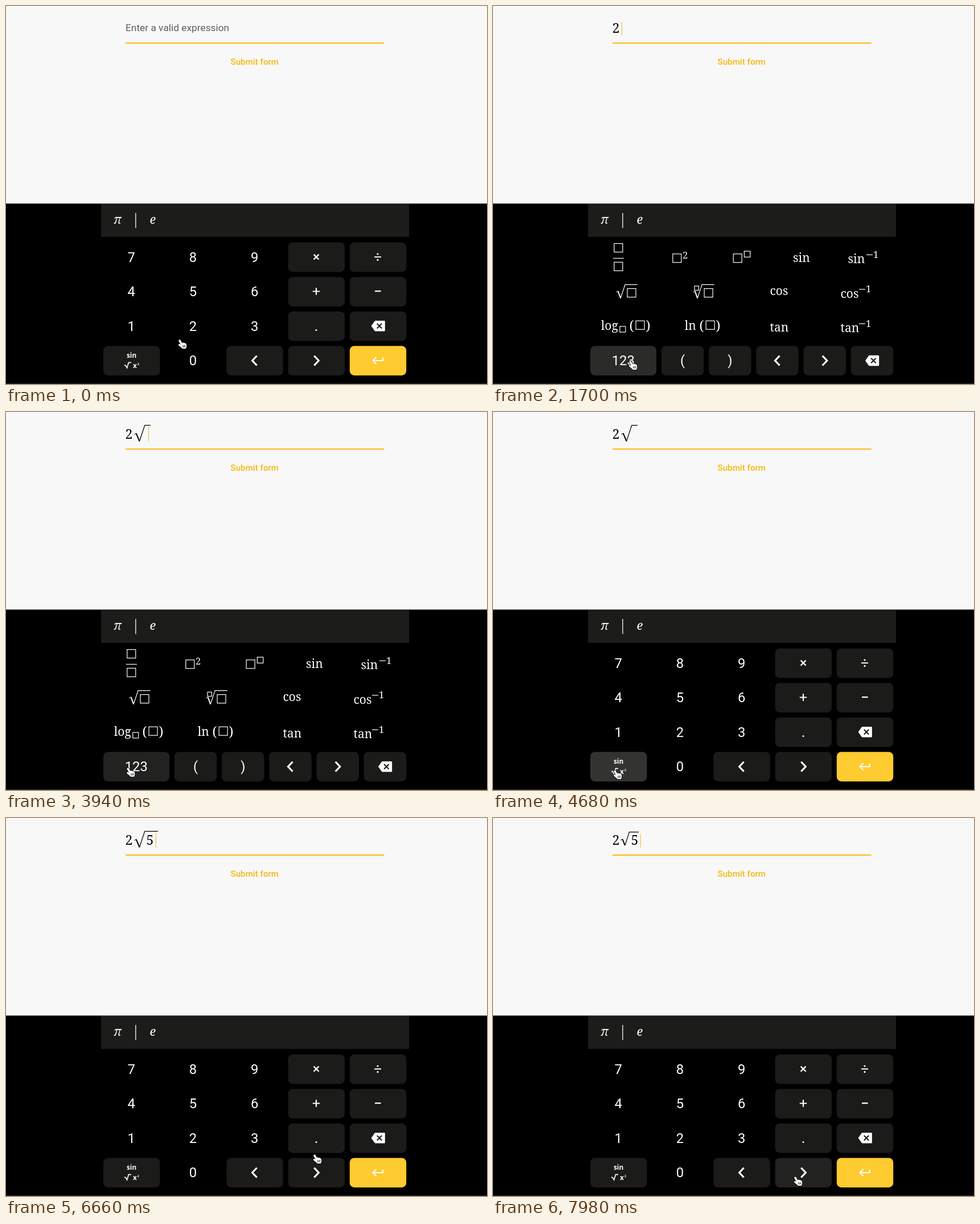
Write an HTML page that moves like this. It is 845 by 663 pixels and loops after 8 s.

```html
<!DOCTYPE html>
<html lang="en">
<head>
<meta charset="utf-8">
<title>Math keyboard</title>
<style>
  html, body { margin: 0; width: 100%; height: 100%; overflow: hidden; background: #f8f8f8; }
  svg { display: block; width: 845px; height: 663px; }
  .ui { font: 23.8px Roboto, sans-serif; fill: #fff; text-anchor: middle; }
  .hint { font: 17.32px Roboto, sans-serif; fill: #5e5e5e; }
  .submit { font: 500 15.15px Roboto, sans-serif; fill: #f3b90c; text-anchor: middle; }
  .word { font: 21px "Noto Serif", serif; fill: #fff; }
  .digit { font: 23px "Noto Serif", serif; }
  .sup { font: 16.5px "Noto Serif", serif; fill: #fff; }
  .var { font: italic 21.5px "Noto Serif", serif; fill: #fff; }
  .icon { font: bold 11.8px "Open Sans", sans-serif; fill: #fff; text-anchor: middle; }
  .line { fill: none; stroke: #fff; }
</style>
</head>
<body>
<svg id="stage" viewBox="0 0 845 663" xmlns="http://www.w3.org/2000/svg"></svg>
<script>
const stage = document.getElementById('stage');
const LOOP = 8000, BLINK = 530;
const LEFT = 166.6, WIDTH = 541, TOP = 410.3, ROW = 60.5, GAP = 4.4;
const DARK = '#1b1b1a', GOLD = '#fecb30';

function add(parent, tag, attrs = {}, content = '') {
  const el = document.createElementNS('http://www.w3.org/2000/svg', tag);
  for (const k in attrs) el.setAttribute(k, attrs[k]);
  el.textContent = content;
  parent.appendChild(el);
  return el;
}
const rect = (p, x, y, width, height, fill, rx = 0) =>
  add(p, 'rect', { x, y, width, height, fill, rx });
const text = (p, cls, x, y, s) => add(p, 'text', { class: cls, x, y }, s);
const line = (p, d, w, stroke = '#fff') =>
  add(p, 'path', { class: 'line', d, style: `stroke:${stroke};stroke-width:${w}` });
const box = (p, x, y, size = 15) =>
  add(p, 'rect', { class: 'line', x, y, width: size, height: size, 'stroke-width': 1.2 });
const dot = (p, cx, cy, r) => add(p, 'circle', { cx, cy, r, fill: '#fff' });
const show = (el, on) => el.setAttribute('display', on ? 'inline' : 'none');

// Radical sign: hook at (x, mid), foot at y = low, bar from y = top to x = end
function radical(p, x, mid, low, top, end, color = '#fff') {
  const g = add(p, 'g'), rise = (low - top) * .66, foot = x + rise * .5;
  line(g, `M${x} ${mid + 2}l3.6 -2`, 1, color);
  line(g, `M${x + 3.4} ${mid}L${foot} ${low}`, 2, color);
  line(g, `M${foot} ${low}L${x + rise} ${top}H${end}`, 1.25, color);
  return g;
}
function backspace(p, cx, cy) {
  add(p, 'path', {
    fill: '#fff',
    d: `M${cx - 12} ${cy}l6-8.5q.6-.7 1.7-.7h15.200q1.300 0 1.300 1.300v15.800q0 1.300-1.300 1.300h-15.200q-1.100 0-1.700-.7z`
  });
  line(p, `M${cx - 1.8} ${cy - 4.2}l8.4 8.4m0-8.4l-8.4 8.4`, 2.1, DARK);
}
const chevron = (p, cx, dir) => line(p, `M${cx - dir * 4} 613.5l${dir * 8} 8.5l${-dir * 8} 8.5`, 3.2);

// Form
rect(stage, 0, 0, 845, 347, '#f8f8f8');
const hint = text(stage, 'hint', 210, 44.3, 'Enter a valid expression');
rect(stage, 210, 64, 454.5, 2, '#ffb90c');
text(stage, 'submit', 436.8, 102.6, 'Submit form');
const two = text(stage, 'digit', 209.4, 46.6, '2');
const five = text(stage, 'digit', 0, 46.6, '5');
const empty = radical(stage, 225.3, 37.4, 51.3, 23.4, 254, '#000');
const wide = radical(stage, 225.3, 37.4, 51.3, 23.4, 267, '#000');
const tight = radical(stage, 224, 37, 48, 24.5, 256, '#000');
const caret = rect(stage, 0, 0, 1.2, 0, '#f2c14a');

// Keyboard frame
rect(stage, 0, 346.5, 845, 316.5, '#000');
rect(stage, 0, 662, 845, 1, '#3a2c2a');
rect(stage, 167, 347, 541, 58, '#1c1c1a');
text(stage, 'var', 189.4, 382, 'π');
text(stage, 'var', 252.4, 382, 'e');
rect(stage, 227.2, 363, 1.3, 26.4, '#fff');

// Keys: each has a base plate and a white layer for hover and press
const numbers = add(stage, 'g'), funcs = add(stage, 'g');
const keys = [];
function key(page, x, row, cell, fill) {
  const y = TOP + row * ROW + GAP, w = cell - 2 * GAP, h = ROW - 2 * GAP;
  rect(page, x + GAP, y, w, h, fill, 8);
  keys.push({ page, x: x + GAP, y, w, h, light: rect(page, x + GAP, y, w, h, '#fff', 8) });
}

// Number page
const COL = WIDTH / 5, colMid = c => LEFT + COL * (c + .5) - .4;
const rowMid = r => TOP + ROW * (r + .5);
['789**', '456**', '123**', '*0***'].forEach((s, r) => [...s].forEach((ch, c) => {
  const enter = r === 3 && c === 4;
  key(numbers, LEFT + c * COL, r, COL, enter ? GOLD : ch === '*' ? DARK : '#000');
  if (ch !== '*') text(numbers, 'ui', colMid(c), rowMid(r) + 8, ch);
}));
line(numbers, 'M540.6 435.6l9 9m0-9l-9 9', 2.2);
line(numbers, 'M647 440.200h12', 2);
dot(numbers, 653, 435, 1.6);
dot(numbers, 653, 445.4, 1.6);
line(numbers, 'M538.8 500.5h12.4m-6.200-6.200v12.4M648 500.200h10.6', 2.2);
dot(numbers, 545, 568.4, 1.5);
backspace(numbers, 653.6, 561.3);
chevron(numbers, 436.7, -1);
chevron(numbers, 545.3, 1);
line(numbers, 'M662 616.500v5.500h-17.500m6-6l-6 6l6 6', 2.1);
text(numbers, 'icon', 220.6, 617, 'sin');
line(numbers, 'M207.8 630.4h2.200l2.600 4.400l2.800-9.400h4.600', 1.6);
text(numbers, 'icon', 226.4, 634.6, 'x');
text(numbers, 'icon', 232.2, 629.6, '2').style.fontSize = '5.5px';

// Function page
[5, 4, 4].forEach((n, r) => {
  for (let c = 0; c < n; c++) key(funcs, LEFT + c * WIDTH / n, r, WIDTH / n, '#000');
});
const SMALL = WIDTH / 6.5, smallMid = i => LEFT + SMALL * (i + 2);
key(funcs, LEFT, 3, SMALL * 1.5, DARK);
for (let i = 0; i < 5; i++) key(funcs, smallMid(i) - SMALL / 2, 3, SMALL, DARK);
text(funcs, 'ui', 228.8, 629.8, '123');
text(funcs, 'ui', smallMid(0), 629.8, '(');
text(funcs, 'ui', smallMid(1), 629.8, ')');
chevron(funcs, smallMid(2), -1);
chevron(funcs, smallMid(3), 1);
backspace(funcs, smallMid(4), 622);

box(funcs, 212.8, 416.6);
line(funcs, 'M211 442.500h19', 1.2);
box(funcs, 212.8, 449.4);
box(funcs, 315.8, 434.8);
text(funcs, 'sup', 333, 443, '2');
box(funcs, 422.2, 434.8);
box(funcs, 441.4, 430, 10.4);
['sin', 'cos', 'tan'].forEach((s, r) => {
  const x = r ? 486.5 : 527, y = r ? 446.5 + r * ROW : 448.6;
  text(funcs, 'word', x, y + (r > 1 ? 3 : 0), s);
  const supX = r ? 643 : 656, base = 451.4 + r * ROW;
  text(funcs, 'word', supX - 32.5, base, s);
  line(funcs, `M${supX} ${base - 15}h11`, 1.2);
  text(funcs, 'sup', supX + 12, base - 9.5, '1');
});
for (const x of [216.2, 351.3]) {
  radical(funcs, x, 500, 512.5, 488.5, x + 37.4);
  box(funcs, x + 19.8, 495.6);
}
box(funcs, 354, 491.2, 7.4);
function call(x, name, arg) {
  text(funcs, 'word', x, 568, name);
  text(funcs, 'digit', arg, 568.6, '(').style.fill = '#fff';
  box(funcs, arg + 11.6, 552.2);
  text(funcs, 'digit', arg + 29, 568.6, ')').style.fill = '#fff';
}
call(189.8, 'log', 239.4);
box(funcs, 222.8, 562, 10);
call(336.8, 'ln', 362.6);

// Pointer
const hand = add(stage, 'g');
add(hand, 'path', {
  fill: '#fff', stroke: '#000', 'stroke-width': 1.4, 'stroke-linejoin': 'round', 'paint-order': 'stroke',
  d: 'M.5 1Q2-.5 3.500 1L6.300 6Q8 4.600 9 6Q11 5 11.700 6.800Q13.600 6.500 13.900 8.500L14.300 12L13 16H7L4.600 13.800L0 10Q-.4 7.400 2 7.800L4 9L.4 2.800Q0 1.800 .5 1Z'
});
line(hand, 'M7.400 10l.5 4m1.600-4.200l.4 4m1.600-4.200l.3 4', .8, '#000');

// Pointer stops: arrive, leave, x, y
const stops = [
  [0, 0, 303, 585],
  [380, 1060, 324, 573],
  [1500, 1700, 239, 622],
  [2200, 3220, 219, 473],
  [4020, 4760, 212, 628],
  [5660, 6260, 326, 508],
  [6660, 6660, 540, 590],
  [6860, 7400, 541, 628],
  [7700, LOOP, 529, 629]
];
const smooth = k => k * k * (3 - 2 * k);
function pointer(t) {
  const i = stops.findIndex(s => t <= s[1]), b = stops[i], a = stops[i - 1] || b;
  const k = t >= b[0] ? 1 : smooth((t - a[1]) / (b[0] - a[1]));
  return [2, 3].map(c => a[c] + (b[c] - a[c]) * k);
}

// Edits of the field, each restarting the caret blink
const edits = [
  { time: 480, x: 225.8, shows: [two] },
  { time: 2600, x: 249.9, shows: [two, empty], inside: true },
  { time: 6180, x: 262.7, shows: [two, wide, five], inside: true },
  { time: 6870, x: 258.6, shows: [two, tight, five] }
];
const toFuncs = 1560, toNumbers = 4600;

function draw(t) {
  const edit = edits.filter(e => t >= e.time).pop();
  show(hint, !edit);
  for (const el of [two, five, empty, wide, tight]) show(el, edit && edit.shows.includes(el));
  show(caret, edit && Math.floor((t - edit.time) / BLINK) % 2 === 0);
  if (edit) {
    five.setAttribute('x', edit.inside ? 246.4 : 242.6);
    caret.setAttribute('x', edit.x);
    caret.setAttribute('y', edit.inside ? 26.5 : 28);
    caret.setAttribute('height', edit.inside ? 25.5 : 23.5);
  }

  const page = t >= toFuncs && t < toNumbers ? funcs : numbers;
  show(numbers, page === numbers);
  show(funcs, page === funcs);

  const [x, y] = pointer(t);
  hand.setAttribute('transform', `translate(${x} ${y})`);
  const age = t - (t < toNumbers ? toFuncs : toNumbers);
  const flash = age < 0 ? 0 : .17 * Math.exp(-age / 100);
  for (const k of keys) {
    const px = x + 2 - k.x, py = y + 3 - k.y;
    const over = k.page === page && px > 0 && px < k.w && py > 0 && py < k.h;
    const pressed = k.y > 590 && k.x < 200;
    k.light.setAttribute('opacity', (over ? .03 : 0) + (pressed ? flash : 0));
  }
}

const start = performance.now();
function tick() {
  draw((performance.now() - start) % LOOP);
  requestAnimationFrame(tick);
}
draw(0);
requestAnimationFrame(tick);
</script>
</body>
</html>
```
